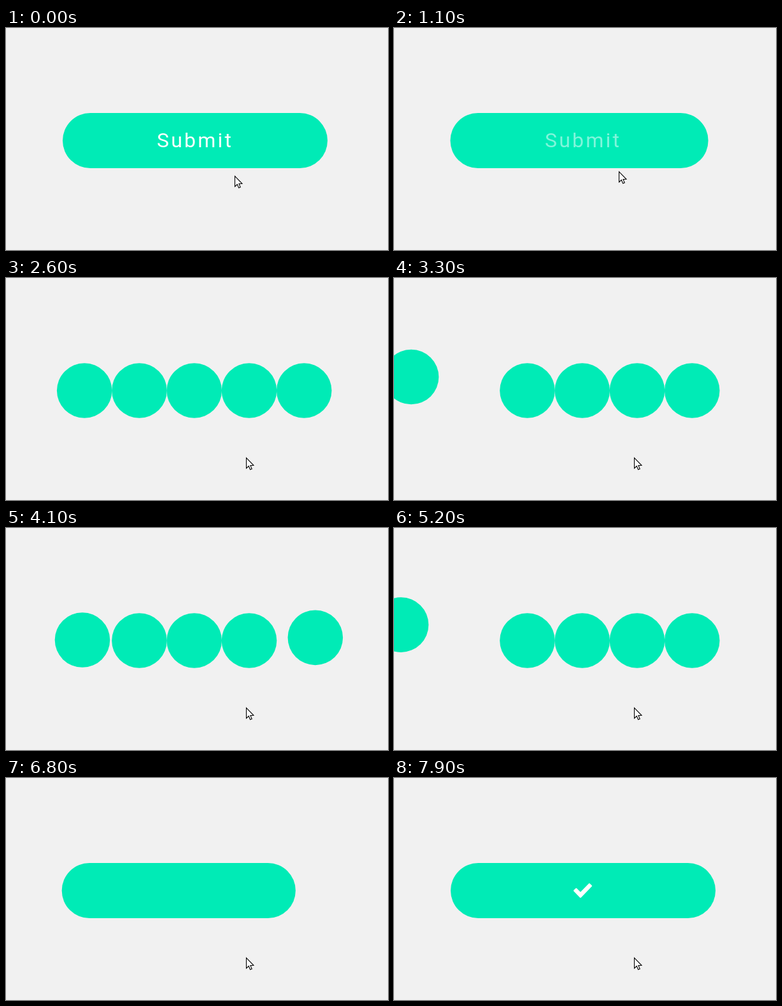
Write an HTML page with a canvas that moves like this. It is 600x350 px and loops after 8100 ms.

```html
<!DOCTYPE html>
<html lang="en">
<head>
<meta charset="utf-8">
<title>Submit button</title>
<style>
  html, body { margin: 0; width: 100%; height: 100%; overflow: hidden; background: #f1f1f1; }
  canvas { display: block; }
</style>
</head>
<body>
<canvas id="stage" width="600" height="350"></canvas>
<script>
const ctx = document.getElementById('stage').getContext('2d');
const LOOP = 8100, STEP = 100;
const BG = '#f1f1f1', GREEN = '#00ebb6';
const CY = 177.5, R = 43.3, FIRST = 123.2, PITCH = 86.25;
const BUTTON = { left: 89, width: 416 };

const clamp = v => Math.min(1, Math.max(0, v));
const span = (t, from, to) => clamp((t - from) / (to - from));
const mix = (a, b, p) => a + (b - a) * p;
const easeOut = p => 1 - (1 - p) ** 2;
const easeInOut = p => p < .5 ? 4 * p ** 3 : 1 - (2 - 2 * p) ** 3 / 2;

function pill(left, width) {
  ctx.fillStyle = GREEN;
  ctx.beginPath();
  ctx.roundRect(left, CY - 43.5, width, 87, Math.min(43.5, width / 2));
  ctx.fill();
}

function ball(x, y, rx = R, ry = R) {
  if (rx <= 0 || ry <= 0) return;
  ctx.fillStyle = GREEN;
  ctx.beginPath();
  ctx.ellipse(x, y, rx, ry, 0, 0, Math.PI * 2);
  ctx.fill();
}

function polygon(points) {
  ctx.beginPath();
  points.forEach(([x, y]) => ctx.lineTo(x, y));
  ctx.closePath();
}

function label(alpha) {
  ctx.globalAlpha = alpha;
  ctx.fillStyle = '#fff';
  ctx.font = '32px Roboto, sans-serif';
  ctx.letterSpacing = '3.2px';
  ctx.fillText('Submit', 237, 188);
  ctx.globalAlpha = 1;
}

function check(alpha) {
  ctx.globalAlpha = alpha;
  ctx.fillStyle = ctx.strokeStyle = '#fff';
  ctx.lineWidth = 2.6;
  ctx.lineJoin = 'round';
  polygon([[283.3, 177.7], [286.2, 174.8], [292.9, 181.6],
           [306.8, 167.3], [309.7, 170.2], [292.9, 187.6]]);
  ctx.fill();
  ctx.stroke();
  ctx.globalAlpha = 1;
}

function cursor(t) {
  const enter = easeOut(span(t, 0, 300));
  const leave = easeInOut(span(t, 900, 1400));
  const x = mix(mix(359, 345, enter), 377, leave);
  const y = mix(mix(233, 206, enter), 283, leave);
  ctx.save();
  ctx.translate(Math.round(x), Math.round(y));
  polygon([[.5, .5], [.5, 17], [4.2, 13.5], [6.6, 19], [9.2, 18], [6.9, 12.6], [11.9, 12.3]]);
  ctx.fillStyle = '#fff';
  ctx.strokeStyle = '#000';
  ctx.lineWidth = 1.1;
  ctx.lineJoin = 'miter';
  ctx.fill();
  ctx.stroke();
  ctx.restore();
}

// The button shrinks towards its left end.
function shrink(t) {
  const p = easeInOut(span(t, 900, 1900));
  pill(mix(BUTTON.left, 72, p), mix(BUTTON.width, 76, p));
  label(1 - span(t, 900, 1300));
}

// Five balls slide out of the remaining blob.
function unfold(t) {
  const p = easeOut(span(t, 1900, 2600));
  for (let k = 0; k < 5; k++) {
    ball(mix(110, FIRST + PITCH * k, p), CY, mix(38, R, p));
  }
}

// Newton's cradle: the outer balls swing in turn.
const HALF = 466, SWING = 492, REACH = 126, LEFT_START = 3164;

function swing(t, start, reach = REACH) {
  return reach * Math.sin(Math.PI * span(t, start, start + SWING));
}

function cradle(t) {
  let left = 0, right = swing(t, LEFT_START - HALF, 35);
  for (let n = 0; n < 3; n++) {
    const start = LEFT_START + 2 * n * HALF;
    left += swing(t, start);
    right += swing(t, start + HALF);
  }
  const lift = d => .212 * d + 1.1 * (1 - Math.exp(-d / 10));
  for (let k = 0; k < 5; k++) {
    const d = k === 0 ? left : k === 4 ? right : 0;
    ball(FIRST + PITCH * k + (k ? d : -d), CY - lift(d));
  }
}

// Halfway shape of each folding ball: x, rx, ry.
const FOLDED = [[FIRST, R, R], [205.5, 36.5, 39.5], [243.2, R, R], [290.3, 1.2, 7], [290, 0, 0]];

function fold(t) {
  const p = span(t, 5980, 6200), q = easeInOut(span(t, 6200, 6420));
  FOLDED.forEach(([x, rx, ry], k) => {
    const keep = k === 0 || k === 2 ? 1 : 1 - q;
    ball(mix(mix(FIRST + PITCH * k, x, p), FIRST, q), CY,
         mix(R, rx, p) * keep, mix(R, ry, p) * keep);
  });
}

function grow(t) {
  const p = easeInOut(span(t, 6400, 7000));
  pill(mix(80, BUTTON.left, p), mix(86.5, BUTTON.width, p));
  check(easeOut(span(t, 7000, 7900)));
}

function draw(t) {
  ctx.fillStyle = BG;
  ctx.fillRect(0, 0, 600, 350);
  if (t < 2000) shrink(t);
  else if (t < 2600) unfold(Math.min(t, 2400));
  else if (t < 6000) cradle(t);
  else if (t < 6400) fold(t);
  else grow(t);
  cursor(t);
}

function tick() {
  const t = performance.now() % LOOP;
  draw(Math.min(7900, Math.floor(t / STEP) * STEP));
  requestAnimationFrame(tick);
}
tick();
</script>
</body>
</html>
```
